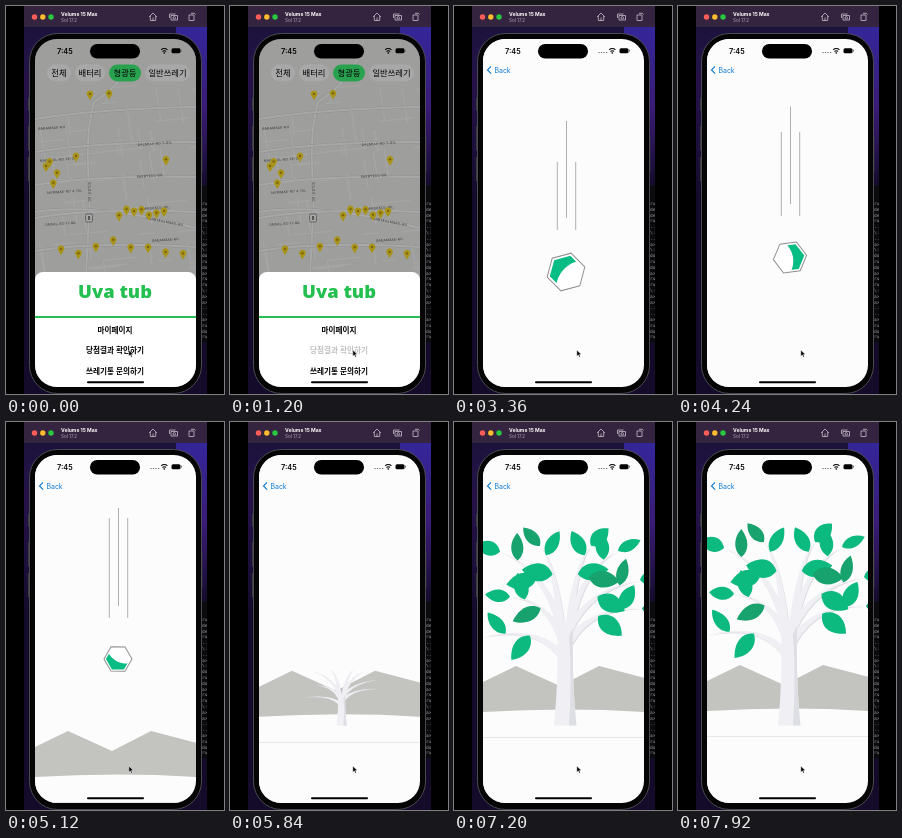
Write an HTML page that moves like this. It is 218 px wide and 388 px high and loops after 8000 ms.

```html
<!DOCTYPE html>
<html lang="ko">
<head>
<meta charset="utf-8">
<style>
html, body { margin: 0; width: 100%; height: 100%; overflow: hidden; background: #000; }
svg { display: block; width: 100vw; height: 100vh; }
text { font-family: Inter, "Noto Sans CJK KR", sans-serif; }
.ko { font-family: "Noto Sans CJK KR", "Noto Sans CJK", sans-serif; font-size: 7.6px; font-weight: 700; text-anchor: middle; }
.chip { font-size: 8.3px; font-weight: 500; }
.title { font: 800 18.4px "Open Sans", "Noto Sans", sans-serif; text-anchor: middle; fill: #24c04f; }
.mono { font: 4.5px "DejaVu Sans Mono", monospace; fill: #999; }
.street { font-size: 3.3px; letter-spacing: .25px; fill: #444; }
</style>
</head>
<body>
<svg viewBox="0 0 218 388">
  <defs>
    <linearGradient id="desk" x2="0" y2="1">
      <stop offset="0" stop-color="#191338"/><stop offset=".2" stop-color="#25124a"/>
      <stop offset=".5" stop-color="#130b2a"/><stop offset="1" stop-color="#140a2a"/>
    </linearGradient>
    <linearGradient id="glow" x2="0" y2="1">
      <stop offset="0" stop-color="#34269a"/><stop offset=".5" stop-color="#3a1c78"/><stop offset="1" stop-color="#150b2c"/>
    </linearGradient>
    <clipPath id="screen"><rect x="29" y="33" width="161" height="348" rx="22"/></clipPath>
    <clipPath id="stage"><rect x="18" y="0" width="183" height="388"/></clipPath>
    <clipPath id="core"><path id="coreShape"/></clipPath>
  </defs>
  <rect width="218" height="388"/>
  <g clip-path="url(#stage)">
    <rect x="18" width="183" height="388" fill="url(#desk)"/>
    <rect x="170" y="20" width="31" height="160" fill="url(#glow)"/>
    <rect x="195" y="180" width="6" height="156" fill="#0b0b0d"/>
    <g id="term"></g>
    <rect x="18" width="183" height="21" fill="#35243f"/>
    <circle cx="28.500" cy="11" r="2.700" fill="#ff5f57"/><circle cx="36.800" cy="11" r="2.700" fill="#febc2e"/><circle cx="45" cy="11" r="2.700" fill="#28c840"/>
    <text x="55" y="10" font-size="5" font-weight="700" fill="#fff">Velume 15 Max</text>
    <text x="55" y="16.200" font-size="4.600" fill="#b3a9ba">Sol 17.2</text>
    <g fill="none" stroke="#c5bdca" stroke-width=".8">
      <path d="M143 11l4-4 4 4M144.300 10v4.500h5.400V10M147 14.500v-3"/>
      <path d="M163.500 12V8h6M165 9.500h6.500V14H165z"/><circle cx="168.300" cy="11.800" r="1.200"/>
      <path d="M183 9h5v5.500h-5zM185 7.300h3.500l1 1.200"/>
    </g>
  </g>
  <path d="M22.500 92v12M22.500 120v24M22.500 151v24M195.800 130v36" stroke="#3a3a42" stroke-width="1.200"/>
  <rect x="23.500" y="27.500" width="172" height="360" rx="28" fill="#050506" stroke="#4b4a50"/>

  <g clip-path="url(#screen)">
    <g id="map">
      <rect x="29" y="33" width="161" height="348" fill="#f0f0ed"/>
      <g id="roads" fill="none" stroke="#fff" stroke-linecap="round"></g>
      <g id="streets"></g>
      <g id="pins"></g>
      <g id="chips"></g>
    </g>
    <rect id="dim" x="29" y="33" width="161" height="348"/>
    <g id="sheet">
      <rect x="29" y="266" width="161" height="130" rx="8" fill="#fff"/>
      <text class="title" x="109" y="292">Uva tub</text>
      <rect x="29" y="310" width="161" height="2" fill="#25bd55"/>
      <text class="ko" x="109" y="326.800">마이페이지</text>
      <text class="ko" x="109" y="347.300" id="pick">당첨결과 확인하기</text>
      <text class="ko" x="109" y="367.800">쓰레기통 문의하기</text>
    </g>
    <g id="page">
      <rect x="29" y="33" width="162" height="348" fill="#fcfcfd"/>
      <g id="net" fill="none"></g>
      <g id="land">
        <path d="M29 259L62 243 106 263 145 243 191 255V289Q112 284 29 289Z" fill="#c3c3c0"/>
        <path d="M29 314.500H191" stroke="#e6e6e9"/>
      </g>
      <g id="speed" stroke="#b0b0b0"></g>
      <g id="tree"></g>
      <g id="seed">
        <path id="shell" fill="#fff" stroke="#8f8f8f"/>
        <g clip-path="url(#core)"><path id="fluid" fill="#08bd83"/></g>
      </g>
      <path d="M37 60.300l-3.500 3.700 3.500 3.700" fill="none" stroke="#087ad6" stroke-width="1.100"/>
      <text x="40.500" y="66.600" font-size="6.900" fill="#087ad6">Back</text>
      <path d="M144.500 46.500h9" stroke="#666" stroke-width="1.200" stroke-dasharray="1.200 1.300"/>
    </g>
    <text x="51" y="47.700" font-size="7.300" font-weight="600">7:45</text>
    <g fill="none" stroke="#000" stroke-width="1.100">
      <path d="M155.200 43.800Q158.300 41.300 161.400 43.800M156.500 45.500Q158.300 44 160.100 45.500"/>
      <circle cx="158.300" cy="46.800" r=".3"/>
    </g>
    <rect x="165.500" y="42.200" width="9" height="5" rx="1.500"/><rect x="175" y="43.700" width="1" height="2" fill="#777"/>
    <rect x="81" y="375.200" width="57" height="2" rx="1"/>
  </g>
  <rect x="84" y="38" width="50" height="14.500" rx="7.200"/>
  <path d="M0 0v6.300l1.500-1.300 1 2.300 1.100-.5-1-2.200h2z" transform="translate(122.800 344)" stroke="#fff" stroke-width=".5"/>
</svg>
<script>
const NS = 'http://www.w3.org/2000/svg';
const $ = id => document.getElementById(id);
const set = (el, attrs) => { for (const k in attrs) el.setAttribute(k, attrs[k]); return el; };
const add = (parent, tag, attrs, text) => {
  const el = set(document.createElementNS(NS, tag), attrs);
  if (text) el.textContent = text;
  return parent.appendChild(el);
};
const clamp = x => Math.max(0, Math.min(1, x));
const smooth = x => (x = clamp(x), x * x * (3 - 2 * x));
const out = x => 1 - (1 - clamp(x)) ** 3;
// Eased value between [time, value, time, value, ...]
const key = (t, k) => {
  for (let i = 0; i + 3 < k.length; i += 2)
    if (t < k[i + 2]) return k[i + 1] + (k[i + 3] - k[i + 1]) * smooth((t - k[i]) / (k[i + 2] - k[i]));
  return k[k.length - 1];
};
let seed = 90210;
const rand = () => (seed = seed * 16807 % 2147483647) / 2147483647;
const hex = r => 'M' + [0, 1, 2, 3, 4, 5].map(i => {
  const a = i * Math.PI / 3;
  return `${r * Math.sin(a)} ${-r * Math.cos(a)}`;
}).join('L') + 'Z';

// Terminal edge
for (let y = 199; y < 334; y += 5.8)
  add($('term'), 'text', { class: 'mono', x: 196, y }, ['de', '\\:', 'a>', 'do', 'ru', '..'][rand() * 6 | 0]);

// Map: minor lanes, then main roads with their names
const road = (d, w, stroke = '#fff') => add($('roads'), 'path', { d, 'stroke-width': w, stroke });
for (let i = 0; i < 60; i++) {
  const x = 29 + rand() * 160, y = 80 + rand() * 185, l = 12 + rand() * 28;
  road(i % 2 ? `M${x} ${y}l${l} ${-l * .1}` : `M${x} ${y}l${l * .15} ${l}`, .8);
}
const main = d => { road(d, 2.8, '#d9d9d6'); road(d, 2); };
main('M134 33Q124 74 88 96Q78 130 84 190L80 270');
main('M29 206Q90 196 190 222');
for (let i = 0; i < 5; i++) {
  const y = 107 + i * 33;
  main(`M29 ${y + 6}Q90 ${y - 4} 190 ${y - 6 + i * 2}`);
}
'BARAMSAE-RO,DALMUJI-RO 7-GIL,NARUSOL-RO 32-GIL,SAEBYEOL-GIL,NURIMAE-RO 4-GIL,MIREUSOL-GIL,ONDAL-RO 11-GIL,GARAMSAE-RO'
  .split(',').forEach((name, i) => {
    const x = i % 2 ? 128 + rand() * 18 : 32 + rand() * 12;
    add($('streets'), 'text', { class: 'street', transform: `translate(${x} ${124 + i * 16}) rotate(-4)` }, name);
  });
add($('streets'), 'text', { class: 'street', transform: 'translate(140 213) rotate(11)' }, 'HANBYEOLMARU-RO');
add($('streets'), 'text', { class: 'street', transform: 'translate(82 176) rotate(89)' }, 'SOLBIT-RO');
add($('streets'), 'rect', { x: 79.5, y: 208, width: 7, height: 8, rx: 1.5, fill: '#fff', stroke: '#555', 'stroke-width': .6 });
add($('streets'), 'text', { x: 81.5, y: 214, 'font-size': 5 }, '8');

const pin = (x, y) => {
  add($('pins'), 'path', { d: `M${x} ${y + 5.5}L${x - 2.8} ${y + .8}A3.300 3.300 0 1 1 ${x + 2.8} ${y + .8}Z`, fill: '#ffe028' });
  add($('pins'), 'circle', { cx: x, cy: y - .8, r: 1.2, fill: '#b89418' });
};
// Pins scattered from left to right inside a box
const scatter = (x, y, w, h, n) => {
  for (let i = 0; i < n; i++) pin(x + w * i / (n - 1), y + h * rand());
};
scatter(84, 87, 19, 2, 2);
scatter(40, 154, 11, 24, 4);
scatter(70, 146, 90, 25, 2);
scatter(113, 203, 45, 8, 7);
scatter(55, 228, 122, 24, 8);

[['전체', 41, 24], ['배터리', 69, 30], ['형광등', 103, 32], ['일반쓰레기', 139, 45]].forEach(([s, x, w], i) => {
  add($('chips'), 'rect', { x, y: 58.5, width: w, height: 17, rx: 8.5, fill: i == 2 ? '#3ef578' : '#fff' });
  add($('chips'), 'text', { class: 'ko chip', x: x + w / 2, y: 70 }, s);
});

// Network and speed lines
const sides = [-1, 1].map(s => ({
  s,
  line: add($('net'), 'line', { stroke: '#c2c2c6', 'stroke-width': 1.2, 'stroke-dasharray': '4 3' }),
  node: add($('net'), 'path', { d: hex(21), fill: '#fcfcfd', stroke: '#8f8f8f' })
}));
const streaks = [0, 1, 2].map(i => add($('speed'), 'line', { x1: 103.3 + i * 9.2, x2: 103.3 + i * 9.2 }));

// Tree: each limb rises from the trunk, bends outward and carries three leaves
const leaves = [];
function limb(x1, y1) {
  const low = Math.max(0, y1 - 150), dir = x1 < 111 ? -1 : 1;
  const x0 = 111 + dir * 4, y0 = 203 + low * .45;
  const cx = x0 + (x1 - x0) * .3, cy = y1 + (y0 - y1) * .2 - low * .25;
  const l = Math.hypot(cx - x0, cy - y0), nx = (cy - y0) / l * 4, ny = (x0 - cx) / l * 4;
  const d = `M${x0 + nx} ${y0 + ny}Q${cx + nx * .5} ${cy + ny * .5} ${x1} ${y1}Q${cx - nx * .5} ${cy - ny * .5} ${x0 - nx} ${y0 - ny}Z`;
  add($('tree'), 'path', { d, fill: '#dcdce3', transform: 'translate(.8 1)' });
  add($('tree'), 'path', { d, fill: '#f0f0f4' });
  [.5, .78, 1].forEach((u, k) => {
    const v = 1 - u;
    const tangent = Math.atan2(v * (cy - y0) + u * (y1 - cy), v * (cx - x0) + u * (x1 - cx)) * 180 / Math.PI;
    leaves.push({
      x: v * v * x0 + 2 * u * v * cx + u * u * x1,
      y: v * v * y0 + 2 * u * v * cy + u * u * y1,
      a: tangent + dir * [65, -55, 0][k],
      l: 31 - 3 * k,
      w: .27 + .12 * rand()
    });
  });
}
[[29, 213], [56, 172], [46, 126], [86, 120], [137, 120], [164, 125], [186, 155], [188, 184]].forEach(p => limb(...p));
add($('tree'), 'path', { d: 'M100 303.500Q105 255 103 200Q111 194 119 202Q118 262 122.500 303.500Z', fill: '#f0f0f4' });
add($('tree'), 'path', { d: 'M115 303.500Q118 255 115 212L119 204Q118 262 122.500 303.500Z', fill: '#dedee5' });
leaves.forEach((leaf, i) => {
  const { w } = leaf;
  leaf.el = add($('tree'), 'path', {
    d: `M0 0C.2 ${-w} .65 ${-w * 1.15} 1 0C.65 ${w * .95} .25 ${w * 1.1} 0 0Z`,
    fill: i % 4 == 3 ? '#17a26e' : '#0cb97f'
  });
});

function draw(t) {
  // Menu, tap and page push
  const leave = smooth((t - 1360) / 300), push = out((t - 1420) / 430);
  set($('pick'), { opacity: key(t, [1000, 1, 1160, .25]) });
  set($('sheet'), { transform: `translate(0 ${130 * leave})` });
  set($('dim'), { opacity: .34 * (1 - leave) });
  set($('map'), { transform: `translate(${-50 * push} 0)` });
  set($('page'), { transform: `translate(${162 * (1 - push)} 0)` });

  // Falling capsule
  const x = key(t, [2430, 115, 3360, 112]);
  const y = key(t, [2430, 208, 3360, 266, 5120, 237, 5600, 296]);
  const r = key(t, [1650, 8, 2050, 21, 2430, 21, 3360, 19.5, 5120, 14, 5600, 3]);
  const turn = Math.max(0, t - 2430) * .145;
  const dip = r * key(t, [2430, -.05, 3200, .7]);
  const level = r * key(t, [2430, -.5, 3360, -.15]);
  set($('shell'), { d: hex(r) });
  set($('coreShape'), { d: hex(r * .86) });
  set($('fluid'), { d: `M${-r} ${level}Q0 ${level + dip} ${r} ${level - r * .08}V${r}H${-r}Z` });
  set($('seed'), { transform: `translate(${x} ${y}) rotate(${turn})`, opacity: t < 5620 ? 1 : 0 });

  const spread = key(t, [1700, 40, 2240, 103, 2700, 190]);
  for (const { s, line, node } of sides) {
    const nx = 115 + s * spread, ny = 208 - spread * .59;
    set(line, { x1: 115 + s * 18, y1: 198, x2: nx, y2: ny });
    set(node, { transform: `translate(${nx} ${ny})` });
  }
  set($('net'), { opacity: key(t, [1700, 0, 1900, 1, 2420, 1, 2680, 0]) });

  const top = key(t, [2550, 235, 3360, 156, 5120, 96, 5480, 80]);
  const end = key(t, [2550, 235, 3360, 224, 5120, 196, 5480, 80]);
  const lift = key(t, [2550, 0, 3360, 41, 5120, 10]);
  streaks.forEach((el, i) => set(el, { y1: top - (i == 1 ? lift : 0), y2: end - (i == 1 ? 12 : 0) }));
  set($('speed'), { opacity: t > 2550 && t < 5480 ? 1 : 0 });

  // Ground and tree
  set($('land'), { transform: `translate(0 ${key(t, [4450, 150, 5120, 66, 5750, 6, 6640, 1.7, 7920, 0])})` });
  const grow = key(t, [5560, 0, 6300, .95, 6640, .965, 7920, 1]);
  set($('tree'), { transform: `translate(112 303.500) scale(${key(t, [5560, .1, 6200, 1])} ${grow}) translate(-112 -303.500)` });
  leaves.forEach(({ el, x, y, a, l }, i) => {
    const pop = out((t - 5880 - i * 20) / 620);
    const sway = 4 * Math.sin((t - 7920) / 420 + i * .7) * (1 - smooth((t - 6300) / 1600));
    set(el, { transform: `translate(${x} ${y}) rotate(${a + sway - 30 * (1 - pop)}) scale(${l * pop})` });
  });
}
const start = performance.now();
(function tick() {
  draw((performance.now() - start) % 8000);
  requestAnimationFrame(tick);
})();
</script>
</body>
</html>
```
